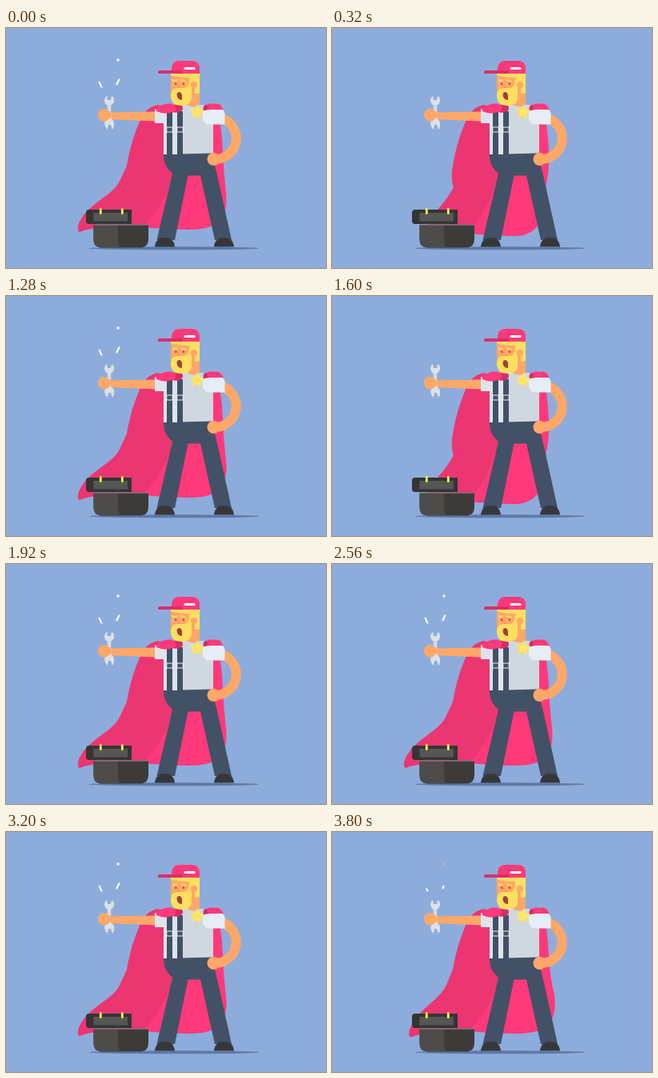
Write an HTML page that moves like this. It is 400 px wide and 300 px high and loops after 3840 ms.

```html
<!DOCTYPE html>
<html lang="en">
<head>
<meta charset="utf-8">
<title>Caped repairman</title>
<style>
html, body { margin: 0; width: 100%; height: 100%; overflow: hidden; background: #8dacdb; }
svg { display: block; width: 100%; height: 100%; }
</style>
</head>
<body>
<svg viewBox="0 0 400 300">
  <ellipse cx="210" cy="275.3" rx="107" ry="2" fill="#5d7aa5"/>

  <path id="capeRight" fill="#ff397a"/>
  <path id="capeLeft" fill="#eb3672"/>

  <g id="toolbox">
    <path d="M109.5 246H178V264Q178 274.5 167 274.5H120Q109.5 274.5 109.5 264Z" fill="#3c3b39"/>
    <path d="M109.5 246H140V264Q140 272 143 274.5H120Q109.5 274.5 109.5 264Z" fill="#4d4c4b"/>
    <path d="M110 246.2H178" stroke="#77787b" stroke-width="1.2"/>
    <path d="M104 227H157V245H104Q100 245 100 241V231Q100 227 104 227Z" fill="#353534"/>
    <path d="M109.5 231H152V241.5H109.5Z" fill="#565655"/>
    <path d="M118.3 226.5V231.5M145.3 226.5V231.5" stroke="#fff04f" stroke-width="2.8" stroke-linecap="round"/>
  </g>

  <g id="legs">
    <path d="M197 156H259V165Q261 172 264.5 186L282 265H261L243 184.5H227.5L211 265H188.5L208 182Q197 173 197 160Z" fill="#435166"/>
    <path d="M186 273.5Q187 262 198.5 262Q210 262 211 273.5ZM260 273.5Q261 262 272.5 262Q284 262 285 273.5Z" fill="#36373b"/>
  </g>

  <g id="torso">
    <path d="M197 101L218 96H246L259 102V156.5L197 158Z" fill="#cfd7e0"/>
    <path d="M197 104H221V158H197ZM186 101H202V119H186Z" fill="#dde4ec"/>
    <path d="M201 104H208V158.5H201ZM214 104H221V158.5H214Z" fill="#435166"/>
    <path d="M200.7 124H208.3V130H200.7ZM213.7 124H221.3V130H213.7Z" fill="none" stroke="#e9eef5" stroke-width="1.2"/>
  </g>

  <g id="arms" fill="#ffa768">
    <path d="M270 113A26.2 26.2 0 0 1 262 164" fill="none" stroke="#ffa768" stroke-width="12"/>
    <circle cx="259.5" cy="164" r="8"/>
    <path d="M126 105.5L186 104.5V116.5L126 114Z"/>
  </g>

  <path id="neck" d="M224 74H242V96Q236 101 226 96Z" fill="#ffa768"/>
  <g id="collar" fill="#ff397a">
    <path d="M188 104Q185 96 194 97Q203 92 210 96Q221 94 221 101Q218 107 207 105Q199 109 188 104Z"/>
    <path d="M247 103Q245 97 251 96Q255 93 260 95Q268 93 271 101L273 106H250Z"/>
    <path d="M211 96Q221 94 221 101Q218 107 209 105Q215 103 211 96ZM247 103Q245 97 251 96L253 103Z" fill="#d72c66"/>
  </g>
  <path d="M246 104Q250 102 256 102H270Q273.5 103 273.5 107V120.5H252Q244 118 246 104Z" fill="#e6edf5"/>
  <path id="badge" fill="#ffe662"/>

  <g id="head">
    <path d="M206 57H231V84H206Z" fill="#ffa768"/>
    <path d="M206 56H242V80Q242 82 239 82H236V70H229V62Q216 62 206 59Z" fill="#ffdf5f"/>
    <path d="M206 84Q206 76 214 75H222Q228 75 229 66H232V86Q232 97 219 97Q206 97 206 84Z" fill="#ffdf5f"/>
    <circle cx="235" cy="71" r="4.3" fill="#ffa768"/>
    <path d="M213.5 84Q213.5 80 217 80Q220 81 220 85V90Q214.5 90 213.5 84Z" fill="#9c4439"/>
    <circle cx="212.3" cy="69.8" r="1.2" fill="#a5423a"/>
    <circle cx="222" cy="69.8" r="1.2" fill="#a5423a"/>
    <path d="M208 66L214 65.5M218 65L225 67" stroke="#ffdf5f" stroke-width="1.8"/>
    <path d="M215 70V74H218" fill="none" stroke="#f18c55"/>
    <path d="M207 57V50Q208 41 217 41H232Q242 41 242 51V57Z" fill="#ff397a"/>
    <path d="M192 53H221V57H190Q190 53 192 53Z" fill="#dc2d69"/>
    <path d="M224 50.5H235" stroke="#fff" stroke-width="3.2" stroke-linecap="round"/>
  </g>

  <g id="wrench">
    <path d="M129 94V116" stroke="#d5dbe1" stroke-width="4.6"/>
    <path d="M126 85L127 90H131L132 85Q136 87 135 92Q133 97 129 97Q124 97 123 91Q123 87 126 85ZM127 127L128 121H131L133 127Q136 123 135 118Q133 113 129 113Q124 114 123 119Q124 125 127 127Z" fill="#dce1e7"/>
  </g>
  <circle cx="122.7" cy="108.7" r="7.8" fill="#ffa768"/>
  <path d="M122 104.5H130Q133 108 130 113H122Z" fill="#ffa768"/>

  <path id="sparks" fill="none" stroke="#fff" stroke-width="2"/>
  <path id="twinkle" fill="#fff"/>
</svg>
<script>
const PERIOD = 640;
const TAU = Math.PI * 2;
const setPath = (id, d) => document.getElementById(id).setAttribute("d", d);
const clamp = v => Math.min(1, Math.max(0, v));

function star(cx, cy, points, outer, inner, turn) {
  const corners = Array.from({ length: points * 2 }, (_, i) => {
    const r = i % 2 ? inner : outer, a = turn + i * Math.PI / points;
    return `${cx + r * Math.cos(a)} ${cy + r * Math.sin(a)}`;
  });
  return `M${corners.join("L")}Z`;
}

function drawCape(t) {
  // Each point of the cloth swings around its centre, peaking at its own time.
  const swing = (centre, size, peak) => centre + size * Math.cos(TAU * (t - peak) / PERIOD);
  const tipX = swing(101, -18, 95), tipY = swing(262, 8, 370);
  const midX = swing(147, -5, 30), midY = swing(195, 4, 300);
  const edgeX = swing(271, 10, 520), edgeY = swing(210, 4, 560);
  const hemY = swing(256, 4, 300);

  setPath("capeLeft",
    `M190 96Q174 99 167 117C158 138 154 155 151 172Q148 ${midY - 12} ${midX} ${midY}
     C${midX - 9} ${midY + 20} ${tipX + 10} ${tipY - 36} ${tipX} ${tipY - 8}
     Q${tipX - 1} ${tipY - 1} ${tipX + 2} ${tipY}
     Q${tipX + 14} ${tipY - 5} 124 ${hemY - 2}H170Q206 212 208 175L202 100Z`);
  setPath("capeRight",
    `M196 100H264Q270 125 271 155Q272 180 ${edgeX} ${edgeY - 10}
     C${edgeX + 4} ${edgeY + 24} ${edgeX - 8} ${hemY} 230 ${hemY}
     Q196 ${hemY} 165 ${hemY - 4}L200 160Z`);
}

function drawSparkle(t) {
  const age = (t + 80) % PERIOD;
  const head = 12 * Math.sin(clamp(age / 170) * Math.PI / 2);
  const tail = 12 * clamp((age - 85) / 160);
  const ray = (x, y, dx, dy) =>
    `M${x + dx * tail} ${y + dy * tail}L${x + dx * head} ${y + dy * head}`;
  setPath("sparks", tail < head
    ? ray(119.7, 74.3, -.42, -.9) + ray(138, 71, .47, -.88) : "");

  const r = 3.2 * Math.sin(Math.PI * clamp((t + 60) % PERIOD / 280));
  setPath("twinkle", star(140, 40, 4, r * 1.2, r * .6, Math.PI / 4));
}

setPath("badge", star(238.8, 105.3, 5, 10, 5, -1.45));

const start = performance.now();
function frame() {
  const t = (performance.now() - start) % PERIOD;
  drawCape(t);
  drawSparkle(t);
  requestAnimationFrame(frame);
}
frame();
</script>
</body>
</html>
```
